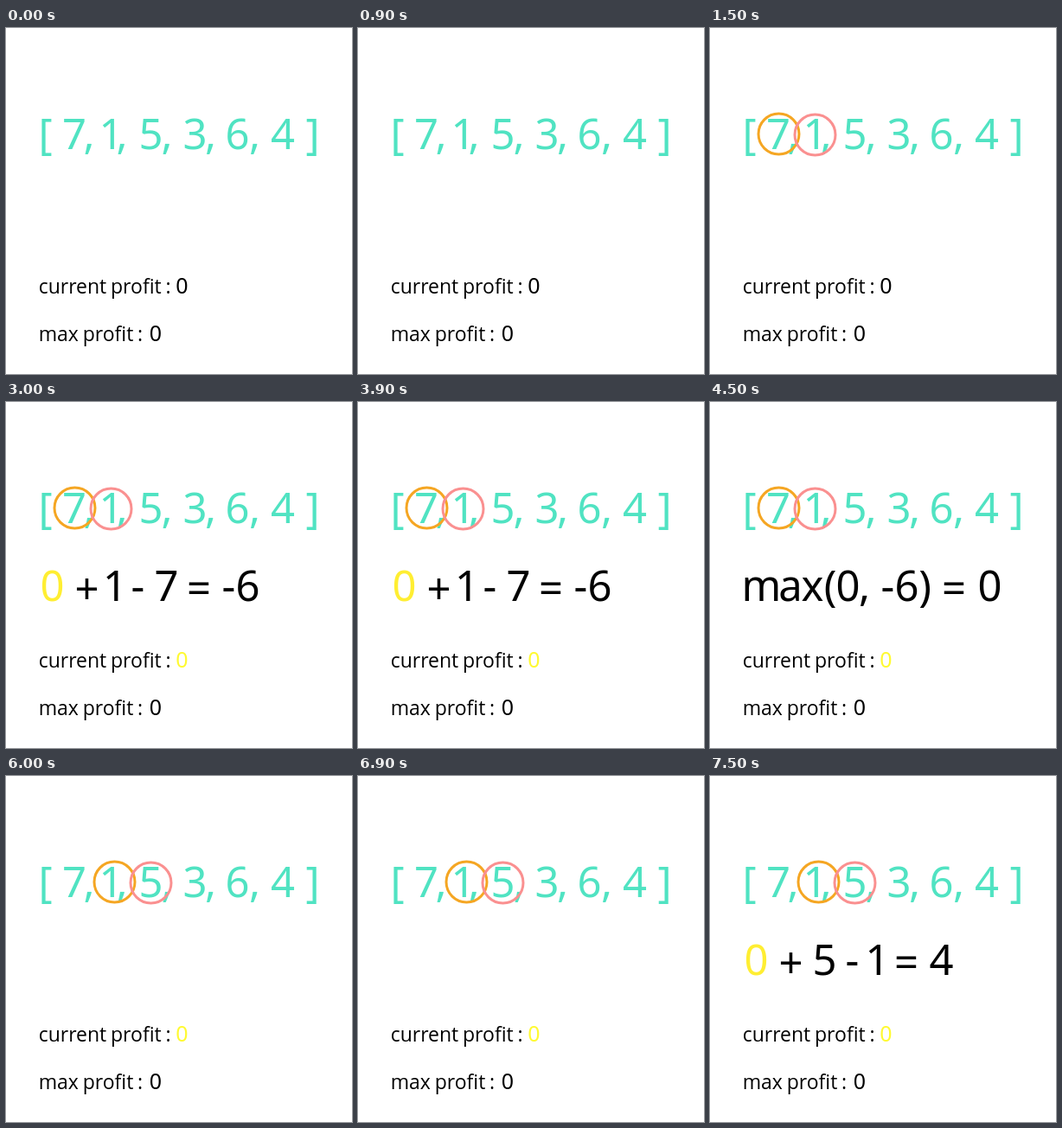
Animation of 400x400 px, one loop 8000 ms. Source, as an HTML page:

```html
<!DOCTYPE html>
<html lang="en">
<head>
<meta charset="utf-8">
<title>Maximum profit step by step</title>
<style>
  html, body { margin: 0; width: 100%; height: 100%; overflow: hidden; background: #fff; }
  svg { display: block; width: 400px; height: 400px; }
  text { font-family: "Noto Sans", "Open Sans", sans-serif; }
  .big { font-size: 49px; text-anchor: middle; }
  .label { font-family: "Open Sans", "Noto Sans", sans-serif; font-size: 23px; word-spacing: -1.2px; }
  .value { font-size: 25px; text-anchor: middle; }
  circle { fill: none; stroke-width: 3; }
</style>
</head>
<body>
<svg viewBox="0 0 400 400">
  <text class="big" fill="#50e3c2" y="140"
    x="45.5 79 96 121.5 134 167.5 186 218.5 236.5 267.5 287.5 320 354.5">[7,1,5,3,6,4]</text>
  <circle id="buy" cy="122.5" r="23.5" stroke="#f5a623"/>
  <circle id="sell" cy="123.5" r="23.5" stroke="#fa9090"/>
  <text class="big" id="formula"></text>
  <text class="label" x="37.7" y="307">current profit :</text>
  <text class="value" id="current" x="203.5" y="307">0</text>
  <text class="label" x="37.7" y="362">max profit :</text>
  <text class="value" x="173" y="362">0</text>
</svg>
<script>
const LOOP = 8000, STEP = 1500;
const [buy, sell, formula, current] =
  ["buy", "sell", "formula", "current"].map(id => document.getElementById(id));

// Each glyph of a formula is centred on its own x.
const firstSum = { text: "0+1-7=-6", x: "53.5 93.5 126 152.5 185.5 223 257.5 279.5", sum: true };
const firstMax = { text: "max(0,-6)=0", x: "59.5 93 118.5 139 159.5 178.5 205.5 227.5 248.5 282 323.5" };
const secondSum = { text: "0+5-1=4", x: "53.5 93.5 132.5 164.5 193.5 227 267.5", sum: true };
const firstPair = [79.5, 121.5], secondPair = [125.5, 167.5];

const scenes = [
  {},
  { pair: firstPair },
  { pair: firstPair, formula: firstSum, lit: true },
  { pair: firstPair, formula: firstMax, lit: true },
  { pair: secondPair, lit: true },
  { pair: secondPair, formula: secondSum, lit: true }
];

function show({ pair, formula: line, lit }) {
  [buy, sell].forEach((ring, i) => {
    ring.style.display = pair ? "" : "none";
    if (pair) ring.setAttribute("cx", pair[i]);
  });
  current.setAttribute("fill", lit ? "#fffa32" : "#000");
  formula.textContent = "";
  if (!line) return;
  formula.setAttribute("x", line.x);
  // Plus and equals signs sit slightly lower than the digits.
  formula.setAttribute("y", [...line.text].map(c => "+=".includes(c) ? 232.7 : 230).join(" "));
  if (line.sum) {
    const first = document.createElementNS(formula.namespaceURI, "tspan");
    first.setAttribute("fill", "#ffee32");
    first.textContent = line.text[0];
    formula.append(first, line.text.slice(1));
  } else {
    formula.textContent = line.text;
  }
}

let shown = -1;
const start = performance.now();
function tick() {
  const index = Math.floor((performance.now() - start) % LOOP / STEP);
  if (index !== shown) show(scenes[shown = index]);
  requestAnimationFrame(tick);
}
tick();
</script>
</body>
</html>
```
